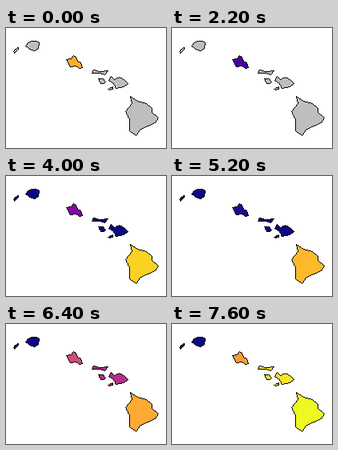
Recreate the animation shown at these times as a matplotlib script. Size 200 by 150 pixels, loop 8 s.

```python
import numpy as np
import matplotlib.pyplot as plt
from matplotlib.animation import FuncAnimation
from matplotlib.path import Path

W, H, DPI = 200, 150, 100
INTERVAL, FRAMES = 200, 40
STEP, LEAD = 600, 200  # map period and how far the loop starts into it (ms)
GRAY = (190 / 255,) * 3
plasma = plt.get_cmap("plasma")

# Capes and bays of each island, in stage pixels.
NIIHAU = [(15, 24), (15, 26), (12, 29), (10, 31), (9, 29), (11, 26)]
KAUAI = [(38, 16), (32, 16), (27, 18), (24, 22), (31, 27), (36, 28), (40, 25), (41, 18)]
OAHU = [(75, 39), (81, 38), (84, 34), (87, 36), (89, 41), (93, 43), (95, 49),
        (91, 50), (87, 47), (80, 48)]
MOLOKAI = [(109, 52), (117, 54), (127, 53), (123, 58), (117, 56), (107, 56)]
LANAI = [(115, 63), (121, 63), (124, 67), (122, 69), (118, 69)]
KAHOOLAWE = [(127, 76), (133, 73), (133, 76), (129, 77)]
MAUI = [(131, 60), (135, 64), (141, 61), (147, 64), (152, 69), (147, 73),
        (137, 75), (134, 69), (128, 65)]
HAWAII = [(155, 85), (164, 91), (175, 94), (182, 100), (182, 105), (190, 112),
          (186, 118), (168, 126), (162, 134), (154, 128), (154, 114), (149, 104),
          (157, 94)]

# Islands of a county, then the key steps and levels its colour runs between.
COUNTIES = [
    ([NIIHAU, KAUAI], [5, 13], [0, 0]),
    ([OAHU], [0, 4, 6, 7, 8, 9, 11, 12, 13],
     [.82, .12, .28, .28, .04, .04, .52, .52, .77]),
    ([MOLOKAI, LANAI, KAHOOLAWE, MAUI], [7, 9, 11, 13], [0, 0, .42, .95]),
    ([HAWAII], [7, 9, 11, 13], [.91, .85, .81, 1]),
]

grid = np.stack(np.meshgrid(np.arange(W), np.arange(H)), axis=-1).reshape(-1, 2)


def fill_mask(islands):
    inside = [Path(p, closed=False).contains_points(grid) for p in islands]
    return np.any(inside, axis=0).reshape(H, W)


def outline_mask(islands):
    """Trace every coast as a hard line one pixel wide."""
    mask = np.zeros((H, W), bool)
    for points in islands:
        for a, b in zip(points, points[1:] + points[:1]):
            count = max(abs(a[0] - b[0]), abs(a[1] - b[1])) + 1
            x, y = np.rint(np.linspace(a, b, count)).astype(int).T
            mask[y, x] = True
    return mask


counties = [(fill_mask(isles), keys, levels) for isles, keys, levels in COUNTIES]
coast = outline_mask([island for isles, _, _ in COUNTIES for island in isles])

fig = plt.figure(figsize=(W / DPI, H / DPI), dpi=DPI, facecolor="white")
ax = fig.add_axes([0, 0, 1, 1])
ax.axis("off")
picture = ax.imshow(np.ones((H, W, 3)), interpolation="nearest", aspect="auto")


def county_color(step, keys, levels):
    if step < keys[0]:
        return GRAY
    return plasma(float(np.interp(step, keys, levels)))[:3]


def draw(i):
    step = (i * INTERVAL + LEAD) // STEP
    rgb = np.ones((H, W, 3))
    for mask, keys, levels in counties:
        rgb[mask] = county_color(step, keys, levels)
    rgb[coast] = 0
    picture.set_data(rgb)
    return [picture]


anim = FuncAnimation(fig, draw, frames=FRAMES, interval=INTERVAL, repeat=True,
                     repeat_delay=0, blit=False)
plt.show()
```
